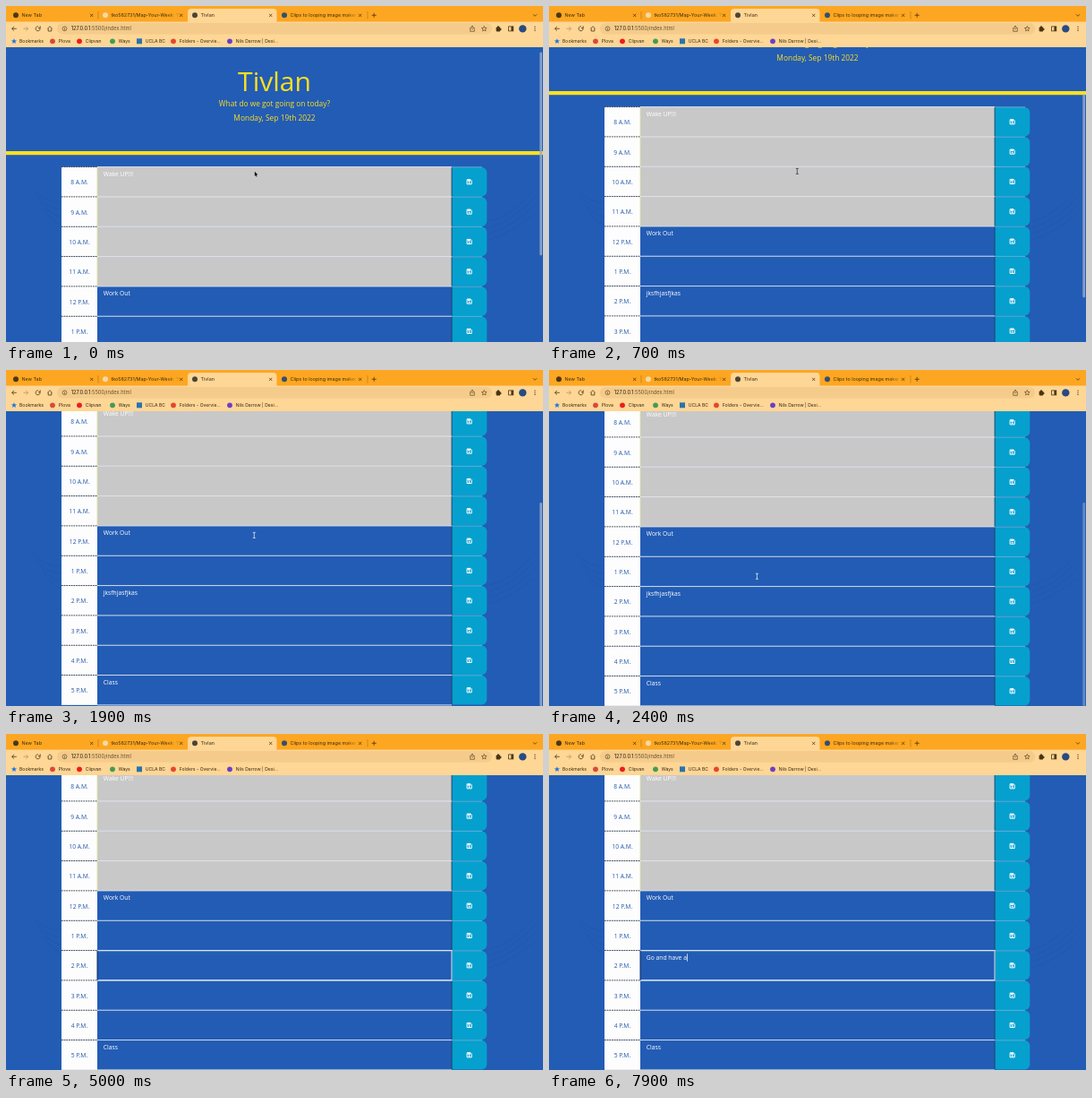
An HTML page with a canvas for the animation above (8 s loop, 600 by 375 pixels).

```html
<!DOCTYPE html>
<html lang="en">
<head>
<meta charset="utf-8">
<title>Tivlan</title>
<style>
  html, body { margin: 0; width: 100%; height: 100%; overflow: hidden; background: #235cb4; }
  canvas { display: block; width: 600px; height: 375px; }
</style>
</head>
<body>
<canvas id="stage"></canvas>
<script>
const W = 600, H = 375, LOOP = 8000, STEP = 100;
const TOP = 46, ROW_Y = 179.6, ROW_H = 33.33;
const UI = 'Inter, sans-serif', BODY = '"Open Sans", "Noto Sans", sans-serif';
const BLUE = '#235cb4', YELLOW = '#fde01f', INK = '#4a3510';

const canvas = document.getElementById('stage');
const ctx = canvas.getContext('2d');
const dpr = window.devicePixelRatio || 1;
canvas.width = W * dpr;
canvas.height = H * dpr;
ctx.scale(dpr, dpr);

const hours = ['8 A.M.', '9 A.M.', '10 A.M.', '11 A.M.', '12 P.M.',
               '1 P.M.', '2 P.M.', '3 P.M.', '4 P.M.', '5 P.M.'];
const notes = { 0: 'Wake UP!!!', 4: 'Work Out', 9: 'Class' };
const EDIT = 6, OLD = 'jksfhjasfjkas', NEW = 'Go and have a';

const FOCUS = 2900, SELECT = 3200, ERASE = 4100;
// [time, letters typed]
const keys = [[ERASE, 0], [5600, 1], [5700, 2], [5900, 3], [6100, 4], [6200, 5], [6400, 6],
              [6500, 7], [6600, 8], [6800, 10], [7700, 11], [7800, 12], [7900, 13]];
const scrollPath = [[0, 0], [100, 2], [200, 11], [500, 54], [700, 67], [900, 71], [1000, 73],
                    [1400, 97], [1800, 136], [1900, 139], [2000, 138]];

function along(path, t) {
  for (let i = 1; i < path.length; i++) {
    const [t0, a] = path[i - 1], [t1, b] = path[i];
    if (t < t1) return a + (b - a) * (t - t0) / (t1 - t0);
  }
  return path[path.length - 1][1];
}

function rect(x, y, w, h, fill) {
  ctx.fillStyle = fill;
  ctx.fillRect(x, y, w, h);
}

function round(x, y, w, h, r, fill) {
  ctx.beginPath();
  ctx.roundRect(x, y, w, h, r);
  ctx.fillStyle = fill;
  ctx.fill();
}

function dot(x, y, r, fill) {
  ctx.beginPath();
  ctx.arc(x, y, r, 0, Math.PI * 2);
  ctx.fillStyle = fill;
  ctx.fill();
}

function line(points, color, width = 0.8, dash = []) {
  ctx.beginPath();
  points.forEach(([x, y], i) => i ? ctx.lineTo(x, y) : ctx.moveTo(x, y));
  ctx.strokeStyle = color;
  ctx.lineWidth = width;
  ctx.setLineDash(dash);
  ctx.stroke();
  ctx.setLineDash([]);
}

function text(str, x, y, size, family, fill, align = 'left') {
  ctx.font = size + 'px ' + family;
  ctx.textAlign = align;
  ctx.fillStyle = fill;
  ctx.fillText(str, x, y);
}

function star(x, y, r, fill, stroke) {
  ctx.beginPath();
  for (let i = 0; i < 10; i++) {
    const a = -Math.PI / 2 + i * Math.PI / 5, d = i % 2 ? r * 0.45 : r;
    ctx.lineTo(x + d * Math.cos(a), y + d * Math.sin(a));
  }
  ctx.closePath();
  if (fill) { ctx.fillStyle = fill; ctx.fill(); }
  if (stroke) { ctx.strokeStyle = stroke; ctx.lineWidth = 0.6; ctx.stroke(); }
}

function tab(x, label, icon, fade) {
  dot(x + 8, 10.3, 3, icon);
  let fill = '#3a2b0c';
  if (fade) {
    fill = ctx.createLinearGradient(x + 76, 0, x + 92, 0);
    fill.addColorStop(0, '#3a2b0c');
    fill.addColorStop(1, 'rgba(58,43,12,0)');
  }
  ctx.save();
  ctx.beginPath();
  ctx.rect(x, 0, 92, 18);
  ctx.clip();
  text(label, x + 14.5, 12.3, 5.4, UI, fill);
  ctx.restore();
  const cx = x + 92.7, cy = 10.4, r = 1.6;
  line([[cx - r, cy - r], [cx + r, cy + r]], '#3a2b0c', 0.7);
  line([[cx + r, cy - r], [cx - r, cy + r]], '#3a2b0c', 0.7);
}

function drawTabs() {
  rect(0, 0, W, 18, '#fda621');
  round(203, 3, 99.5, 15, [4, 4, 0, 0], '#fed696');
  tab(3, 'New Tab', '#473818');
  tab(103, 'tko582731/Map-Your-Week: The day', '#f4d9a6', true);
  tab(203, 'Tivlan', '#4b4436');
  tab(303, 'Clips to looping image maker o', '#32506e', true);
  line([[103, 6], [103, 14.5]], '#b47412', 0.6);
  line([[404, 6], [404, 14.5]], '#b47412', 0.6);
  line([[408.7, 10.3], [413.7, 10.3]], INK);
  line([[411.2, 7.8], [411.2, 12.8]], INK);
  line([[589, 9.3], [591, 11.3], [593, 9.3]], INK);
}

function drawTools() {
  rect(0, 17.5, W, TOP - 17.5, '#fed696');
  round(57, 19, 486, 12.5, 6.2, '#f4cb8b');
  line([[11.8, 25.3], [6.6, 25.3]], INK);
  line([[9, 22.9], [6.6, 25.3], [9, 27.7]], INK);
  line([[19.5, 25.3], [24.7, 25.3]], '#b99863');
  line([[22.3, 22.9], [24.7, 25.3], [22.3, 27.7]], '#b99863');
  ctx.beginPath();
  ctx.arc(35.6, 25.3, 2.5, -0.4, 4.9);
  ctx.strokeStyle = INK;
  ctx.lineWidth = 0.8;
  ctx.stroke();
  line([[38.2, 22.4], [38.2, 24.6], [36, 24.6]], INK);
  line([[46.4, 25.3], [49, 22.7], [51.6, 25.3]], INK);
  line([[47.2, 25], [47.2, 28], [50.8, 28], [50.8, 25]], INK);
  ctx.beginPath();
  ctx.arc(65.5, 25.3, 2.4, 0, 7);
  ctx.lineWidth = 0.6;
  ctx.stroke();
  line([[65.5, 24.9], [65.5, 26.7]], INK, 0.7);
  dot(65.5, 23.9, 0.4, INK);

  text('127.0.0.1', 72.8, 27.3, 5.7, UI, '#2c210a');
  const w = ctx.measureText('127.0.0.1').width;
  text(':5500/index.html', 72.8 + w, 27.3, 5.7, UI, '#6a5227');

  line([[520, 24.4], [518.7, 24.4], [518.7, 28.3], [523.3, 28.3], [523.3, 24.4], [522, 24.4]], INK, 0.6);
  line([[521, 26.4], [521, 22.2]], INK, 0.6);
  line([[519.7, 23.4], [521, 22.1], [522.3, 23.4]], INK, 0.6);
  star(534.3, 25.5, 3, null, INK);
  round(547.6, 23.6, 4.8, 4.8, 0.8, INK);
  dot(550, 23.4, 1.1, INK);
  dot(552.5, 26, 1.1, INK);
  ctx.strokeStyle = INK;
  ctx.lineWidth = 0.8;
  ctx.strokeRect(561.6, 22.9, 5.2, 5);
  rect(564.4, 22.9, 2.4, 5, INK);
  dot(577.3, 25.4, 4.2, '#274b82');
  [-2.1, 0, 2.1].forEach(d => dot(591, 25.3 + d, 0.65, INK));
}

function drawBookmarks() {
  const marks = [[52, '#d9493a', 'Plova'], [82, '#ee1c1c', 'Clipvan'], [119, '#3f9d57', 'Ways'],
                 [149, '#2774ae', 'UCLA BC'], [187, '#e5472c', 'Folders - Overvie...'],
                 [250, '#6a3fc9', 'Nils Darrow | Desi...']];
  star(9, 39.4, 3.2, '#2374e8');
  text('Bookmarks', 15, 41.2, 5.1, UI, '#33260b');
  marks.forEach(([x, color, label], i) => {
    if (i === 3) rect(x - 3, 36.3, 6, 6, color);
    else dot(x, 39.3, 2.9, color);
    text(label, x + 6.7, 41.2, 5.1, UI, '#33260b');
  });
}

function drawSave(x, y) {
  ctx.beginPath();
  ctx.moveTo(x - 2.5, y - 2.5);
  ctx.lineTo(x + 1.5, y - 2.5);
  ctx.lineTo(x + 2.6, y - 1.4);
  ctx.lineTo(x + 2.6, y + 2.6);
  ctx.lineTo(x - 2.5, y + 2.6);
  ctx.closePath();
  ctx.strokeStyle = '#fff';
  ctx.lineWidth = 1;
  ctx.stroke();
  rect(x - 1.7, y - 2.4, 3, 1.9, '#fff');
  dot(x, y + 1, 0.9, '#fff');
}

function drawRow(i, y) {
  const past = i < 4;
  rect(62, y, 40, ROW_H, '#fdfdfd');
  rect(102, y, 396, ROW_H, past ? '#c8c8c8' : BLUE);
  if (past) rect(101.6, y, 0.8, ROW_H, '#dcdc9c');
  round(498, y + 0.3, 39.3, ROW_H - 0.6, [0, 6, 6, 0], '#06a0ce');
  rect(497.6, y, 0.9, ROW_H, '#173f63');
  line([[62, y], [102, y]], '#2b2f38', 0.9, [1.6, 1.1]);
  line([[102, y], [498, y]], '#e9edf2', 0.9);
  line([[498, y + 0.2], [532, y + 0.2]], '#8fcfe4', 0.6);
  text(hours[i], 82, y + 19.7, 6.75, BODY, '#2459ac', 'center');
  drawSave(517.6, y + ROW_H / 2);
  if (notes[i]) text(notes[i], 108.8, y + 10.2, 6.75, BODY, '#fff');
}

function drawEdit(y, t) {
  if (t >= FOCUS) {
    line([[102, y], [498, y], [498, y + ROW_H], [102, y + ROW_H]], '#d3e6fb', 1.1);
    rect(101.5, y, 1.2, ROW_H, '#12366f');
  }
  let str = OLD, last = FOCUS;
  if (t >= ERASE) {
    const key = keys.filter(k => k[0] <= t).pop();
    last = key[0];
    str = NEW.slice(0, key[1]);
  }
  ctx.font = '6.75px ' + BODY;
  const end = 108.8 + ctx.measureText(str).width;
  const selected = t >= SELECT && t < ERASE;
  if (selected) rect(108.8, y + 3.4, end - 108.8, 9, '#78aae2');
  text(str, 108.8, y + 10.2, 6.75, BODY, '#fff');
  const caretOn = t >= FOCUS && !selected && (t - last) % 1000 < 500;
  if (caretOn) rect(end + 0.4, y + 3.7, 0.7, 8.6, '#fff');
}

function drawSwirls() {
  ctx.strokeStyle = 'rgba(18,66,146,0.16)';
  ctx.lineWidth = 0.8;
  for (let i = 0; i < 4; i++) {
    ctx.beginPath();
    ctx.moveTo(30 + i * 4, 205 + i * 7);
    ctx.quadraticCurveTo(48, 222 + i * 5, 62, 218 + i * 9);
    ctx.moveTo(540, 240 + i * 7);
    ctx.quadraticCurveTo(565, 235 + i * 6, 590, 205 + i * 9);
    ctx.stroke();
  }
}

function drawPage(t) {
  const s = along(scrollPath, t);
  rect(0, TOP, W, H - TOP, BLUE);
  drawSwirls();
  ctx.save();
  ctx.beginPath();
  ctx.rect(0, TOP, W, H - TOP);
  ctx.clip();
  ctx.translate(0, -s);
  text('Tivlan', 300, 95.2, 30, BODY, YELLOW, 'center');
  text('What do we got going on today?', 300, 112.3, 8.33, BODY, YELLOW, 'center');
  text('Monday, Sep 19th 2022', 300, 127.6, 8.4, BODY, YELLOW, 'center');
  rect(0, 162, W, 4.2, YELLOW);
  hours.forEach((_, i) => drawRow(i, ROW_Y + i * ROW_H));
  const bottom = ROW_Y + 10 * ROW_H;
  line([[102, bottom], [498, bottom]], '#e9edf2', 0.9);
  drawEdit(ROW_Y + EDIT * ROW_H, t);
  ctx.restore();
  if (t < 2600) {
    const fade = t < 2300 ? 1 : (2600 - t) / 300;
    const top = 51.5 + Math.min(s, 138) * 0.7;
    round(596.3, top, 2.8, 227, 1.4, `rgba(150,170,205,${0.85 * fade})`);
  }
}

function drawArrow(x, y) {
  const shape = [[0, 0], [0, 5.6], [1.3, 4.5], [2.1, 6.3], [3, 5.9], [2.2, 4.1], [3.9, 4]];
  ctx.beginPath();
  shape.forEach(([dx, dy]) => ctx.lineTo(x + dx, y + dy));
  ctx.closePath();
  ctx.strokeStyle = '#fff';
  ctx.lineWidth = 0.9;
  ctx.stroke();
  ctx.fillStyle = '#111';
  ctx.fill();
}

function drawBeam(x, y, color) {
  line([[x, y - 3], [x, y + 3]], color, 0.8);
  [-3, 3].forEach(d => line([[x - 1.5, y + d], [x + 1.5, y + d]], color, 0.8));
}

function drawPointer(t) {
  if (t < 100) return drawArrow(277.7, 184.6);
  if (t >= ERASE) return;
  const x = along([[0, 277.3], [2000, 277.3], [2600, 210]], t);
  const y = along([[0, 184.4], [2000, 184.4], [2600, 253.2]], t);
  drawBeam(x, y, t < 1700 ? '#3c3c3c' : '#dfe7f2');
}

function frame(now) {
  const t = Math.floor((now - start) % LOOP / STEP) * STEP;
  drawPage(t);
  drawTabs();
  drawTools();
  drawBookmarks();
  drawPointer(t);
  requestAnimationFrame(() => frame(performance.now()));
}

const start = performance.now();
frame(start);
</script>
</body>
</html>
```
